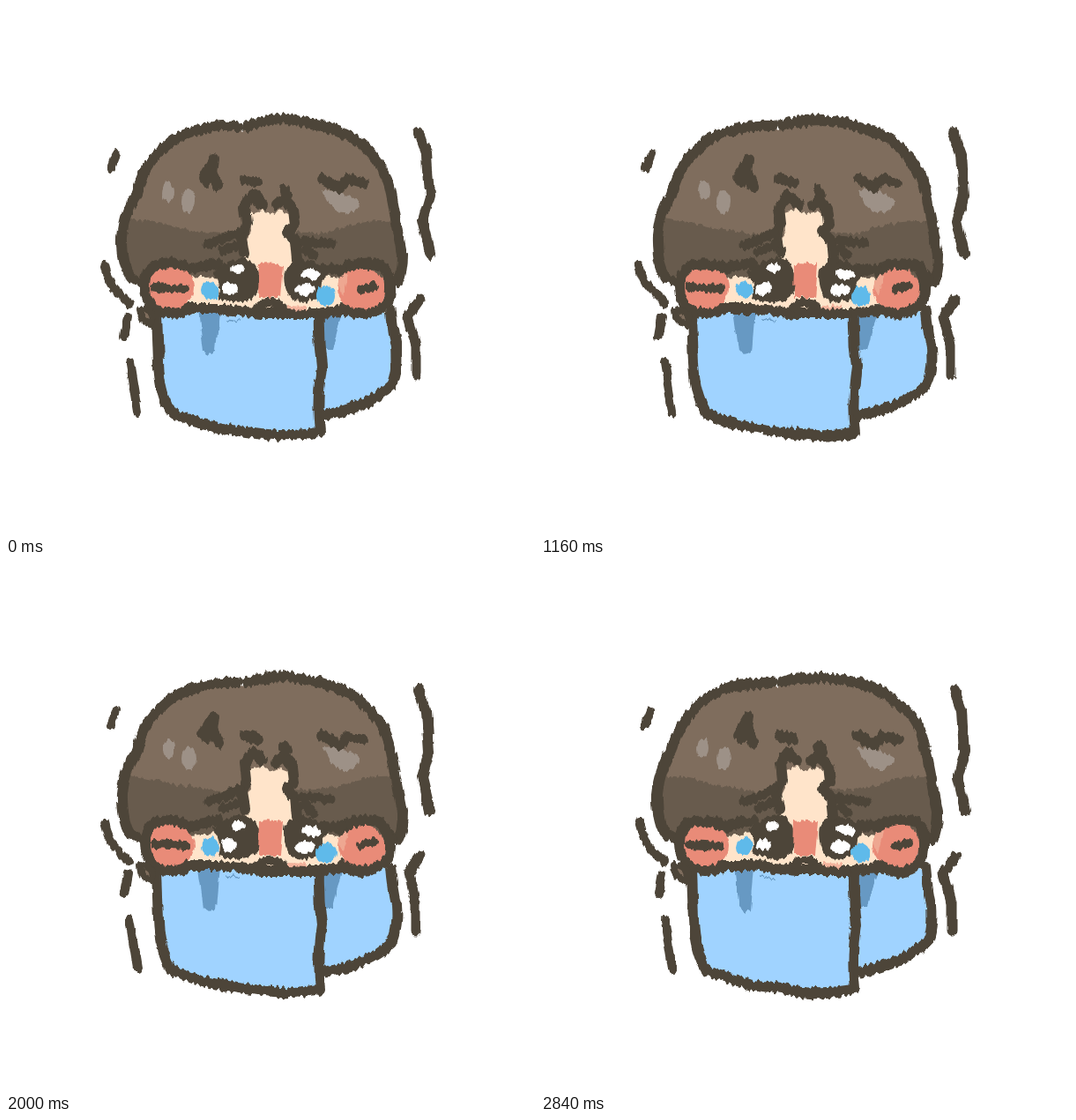
An HTML page for the animation above (2.88 s loop, 600 by 600 pixels).

```html
<!DOCTYPE html>
<html lang="en">
<head>
<meta charset="utf-8">
<title>Shivering face in a mask</title>
<style>
  html, body { margin: 0; width: 100%; height: 100%; overflow: hidden; background: #fff; }
  svg { display: block; width: 100%; height: 100%; }
  .ink { fill: none; stroke: #4d4539; stroke-width: 12; stroke-linecap: round; stroke-linejoin: round; }
  .dark { fill: #4d4539; }
  .skin { fill: #ffe4ca; }
  .blush { fill: #e98b78; }
  .mask { fill: #a0d3ff; }
  .trail { fill: #6799c3; }
  .tear { fill: #5fbaea; }
  .shine { fill: #9d9187; }
</style>
</head>
<body>
<svg viewBox="0 0 600 600">
  <defs>
    <filter id="crayon" filterUnits="userSpaceOnUse" x="0" y="0" width="600" height="600" color-interpolation-filters="sRGB">
      <feTurbulence id="wobble" type="fractalNoise" baseFrequency="0.035" result="wave"/>
      <feDisplacementMap in="SourceGraphic" in2="wave" scale="6" xChannelSelector="R" yChannelSelector="G" result="bent"/>
      <feTurbulence id="grain" type="fractalNoise" baseFrequency="0.3 0.05"/>
      <!-- Mostly vertical tearing -->
      <feColorMatrix values=".4 0 0 0 .3  0 1 0 0 0  0 0 0 0 .5  0 0 0 0 1" result="streaks"/>
      <feDisplacementMap in="bent" in2="streaks" scale="9" xChannelSelector="R" yChannelSelector="G"/>
    </filter>
    <path id="hair" d="M142 312Q131 292 132 262Q135 232 148 214Q157 175 190 152Q222 134 256 136Q265 138 268 142Q276 131 320 129Q362 133 394 150Q430 174 437 214Q442 240 450 282Q450 302 442 314L360 307H240Z"/>
    <clipPath id="inHair"><use href="#hair"/></clipPath>
  </defs>

  <g filter="url(#crayon)">
    <path class="skin" d="M200 300H400V346H205Z"/>
    <use href="#hair" fill="#7f6d5d"/>
    <path clip-path="url(#inHair)" fill="#685b4d" d="M120 238Q150 240 190 250T270 258V320H120ZM328 256Q360 260 385 250T460 244V320H328Z"/>
    <path class="skin" d="M276 234L290 231L301 236L312 232L325 237L322 254L329 268L327 340H272L270 272L278 256Z"/>

    <g class="shine">
      <ellipse cx="184" cy="210" rx="7" ry="11"/>
      <ellipse cx="207" cy="222" rx="8" ry="13"/>
      <path d="M359 209Q372 207 384 212L401 221Q402 231 388 234Q375 236 367 224Z"/>
    </g>

    <!-- Eyes, nose and tears -->
    <path class="dark" d="M234 302Q246 288 270 286Q288 290 288 312Q288 333 268 336Q248 335 240 330Q246 316 234 302ZM317 298Q330 284 350 290L368 304L358 314L356 331Q336 341 321 330Q312 311 317 298Z"/>
    <path class="blush" d="M287 292Q300 290 314 294L311 331H286Z"/>
    <g fill="#fff">
      <ellipse cx="263" cy="298" rx="8" ry="5"/>
      <ellipse cx="253" cy="320" rx="9" ry="7"/>
      <ellipse cx="346" cy="304" rx="11" ry="6" transform="rotate(12 346 304)"/>
      <ellipse cx="340" cy="322" rx="11" ry="7"/>
    </g>
    <ellipse class="blush" cx="187" cy="320" rx="26" ry="25"/>
    <ellipse class="blush" cx="403" cy="321" rx="27" ry="25"/>
    <path fill="#eea791" d="M377 311Q382 303 388 305L382 328Q376 324 377 311Z"/>

    <!-- Mask -->
    <path class="mask" d="M355 348L398 352L437 346Q439 370 443 388Q445 416 438 430Q410 456 357 465Z"/>
    <path class="trail" d="M359 346H383L376 366L370 390H361Z"/>
    <path class="mask" d="M171 350L205 344L290 348L355 348L357 410L356 483Q320 491 280 484Q220 477 188 462Q174 440 173 405Z"/>
    <path class="trail" d="M218 345H242L238 392Q230 398 224 391Z"/>
    <path d="M249 356L266 358" fill="none" stroke="#6799c3" stroke-width="1.5"/>
    <circle cx="158" cy="350" r="7" fill="#7f6d5d"/>

    <g class="ink">
      <path d="M142 309Q131 292 132 262Q135 232 148 214Q157 175 190 152Q222 134 262 136"/>
      <path d="M273 136Q290 129 320 129Q362 133 394 150Q430 174 437 214Q442 240 450 282Q450 302 444 314"/>
      <path stroke-width="10" d="M142 306L154 314M440 313L432 302"/>
      <!-- Ears -->
      <path d="M211 299Q190 288 167 295Q154 306 158 328Q166 350 186 349Q200 349 209 343"/>
      <path d="M380 301Q403 286 427 295Q438 308 434 332Q426 348 404 350Q388 347 381 343"/>
      <path stroke-width="10" d="M169 319L203 321M402 321L418 317"/>
      <!-- Mask outline -->
      <path d="M205 343L240 343L290 349L355 349Q354 380 358 410Q352 450 356 483Q320 491 280 484Q220 477 188 462Q174 440 173 405L171 350"/>
      <path d="M358 348L384 346M437 346Q439 370 443 388Q445 416 438 430Q410 456 360 464"/>
      <path stroke-width="8" d="M151 344Q152 358 165 361Q170 348 158 344"/>
      <path stroke-width="10" d="M286 342Q299 331 314 343"/>
      <!-- Fringe and brows -->
      <path d="M271 280L268 262L273 246L271 227L280 214L291 225M307 226L315 219L325 230L327 248L319 256L329 266L331 288"/>
      <path stroke-width="11" d="M230 270L246 264L265 257M246 277L264 272M338 266L368 269M340 276L348 283"/>
      <path d="M271 196L286 200M315 208L318 214"/>
      <path d="M224 195L236 174L234 190L241 204M227 199L235 190"/>
      <path d="M359 196L378 206L387 196L405 201"/>
      <path d="M214 298L240 291M360 298L382 299"/>
      <!-- Shiver lines -->
      <path stroke-width="10" d="M125 168L119 183M111 294Q115 312 124 322L140 338M138 352L134 375M140 404L145 435L149 460"/>
      <path d="M468 143L477 168L480 215L472 243L481 281"/>
      <path stroke-width="11" d="M470 332L456 352L465 385L465 418"/>
    </g>
    <g class="tear">
      <circle cx="231" cy="322" r="10"/>
      <circle cx="363" cy="329" r="11"/>
    </g>
    <path d="M319 341L341 342" stroke="#f3b39d" stroke-width="4" fill="none"/>
  </g>
</svg>
<script>
  const LOOP = 2880, STEP = 40;
  const wobble = document.getElementById("wobble");
  const grain = document.getElementById("grain");
  const start = performance.now();
  let shown = -1;

  // Every step redraws the same picture with a freshly shaken hand.
  function draw() {
    const step = Math.floor((performance.now() - start) % LOOP / STEP);
    if (step !== shown) {
      shown = step;
      wobble.setAttribute("seed", step + 1);
      grain.setAttribute("seed", step + 101);
    }
    requestAnimationFrame(draw);
  }
  draw();
</script>
</body>
</html>
```
